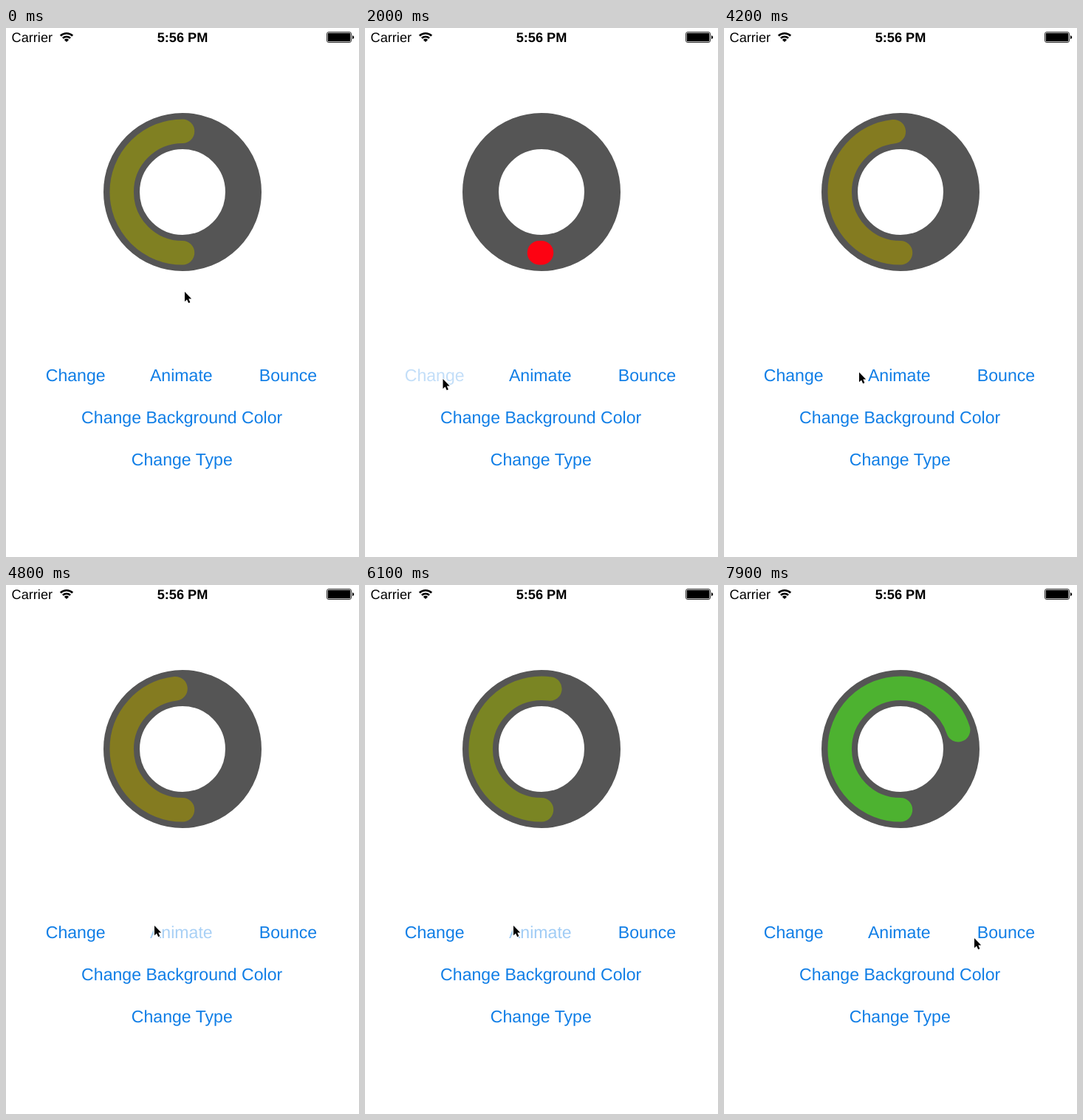
Write an HTML page that moves like this. It is 478x716 px and loops after 8 s.

```html
<!DOCTYPE html>
<html>
<head>
<meta charset="utf-8">
<style>
html, body { margin: 0; width: 100%; height: 100%; overflow: hidden; background: #fff; }
svg { display: block; width: 478px; height: 716px; }
text { font-family: "Liberation Sans", Arial, sans-serif; text-rendering: geometricPrecision; }
.button { font-size: 23.1px; fill: #107ee6; text-anchor: middle; }
.status { font-size: 18.2px; }
</style>
</head>
<body>
<svg viewBox="0 0 478 716">
  <text class="status" x="7.5" y="19">Carrier</text>
  <g fill="none" stroke="#000" stroke-width="2.6">
    <path d="M73.8 10.5 A12 12 0 0 1 90.2 10.5"/>
    <path d="M76.9 13.8 A7.4 7.4 0 0 1 87.1 13.8"/>
  </g>
  <path d="M82 19 L78.9 15.9 A4.4 4.4 0 0 1 85.1 15.9 Z"/>
  <text class="status" x="239" y="19" text-anchor="middle" font-weight="bold">5:56 PM</text>
  <rect x="434.5" y="5.5" width="33" height="14" rx="2.5" fill="none" stroke="#000" stroke-width="0.8"/>
  <rect x="435.7" y="6.7" width="30.6" height="11.6" rx="1.2"/>
  <path d="M469 10 Q471.2 10.5 471.2 12.5 T469 15 Z"/>

  <circle cx="239" cy="222" r="82.5" fill="none" stroke="#555" stroke-width="49"/>
  <circle id="arc" cx="239" cy="222" r="82.3" fill="none" stroke-width="32.5" stroke-linecap="round"
    pathLength="1" transform="rotate(90 239 222)"/>

  <text class="button" id="change" x="94.2" y="478">Change</text>
  <text class="button" id="animate" x="237.3" y="478">Animate</text>
  <text class="button" x="382" y="478">Bounce</text>
  <text class="button" x="238.2" y="535">Change Background Color</text>
  <text class="button" x="238.3" y="592">Change Type</text>

  <path id="cursor" d="M0 0 V13.2 L3 10.4 L5.2 15.2 L7.4 14.2 L5.3 9.6 H9.2 Z"
    stroke="#fff" stroke-width="1.8" stroke-linejoin="round" paint-order="stroke"/>
</svg>
<script>
const LOOP = 8000, STEP = 100, FADE = 500;
const el = id => document.getElementById(id);
const arc = el("arc"), cursor = el("cursor");

// button, press time, release time, new progress, duration of the ring's move
const clicks = [
  ["change", 1000, 1080, 0.3, 0],
  ["change", 1900, 1970, 0.006, 0],
  ["change", 2500, 2580, 0.5, 0],
  ["change", 3000, 3095, 0.869, 0],
  ["change", 3500, 3590, 0.482, 0],
  ["animate", 4600, 4700, 0.408, 400],
  ["animate", 5300, 5320, 0.52, 400],
  ["animate", 5900, 5980, 0.597, 400],
  ["animate", 6700, 6820, 0.699, 400]
];

// time, x, y of the pointer's tip
const stops = [
  [0, 242, 357], [800, 105.5, 475], [3700, 105.5, 475], [4200, 183, 466],
  [4400, 201, 461], [7400, 201, 461], [7900, 339, 478]
];

const clamp = v => Math.min(1, Math.max(0, v));
const ease = v => v * v * (3 - 2 * v);
const mix = (a, b, k) => a + (b - a) * k;

function pointer(t) {
  const i = Math.max(1, stops.findIndex(s => s[0] >= t));
  const [t0, x0, y0] = stops[i - 1], [t1, x1, y1] = stops[i];
  const k = ease(clamp((t - t0) / (t1 - t0)));
  return [mix(x0, x1, k), mix(y0, y1, k)];
}

function draw(t) {
  let p = 0.5;
  const alpha = { change: 1, animate: 1 };
  for (const [name, press, release, value, move] of clicks) {
    if (t >= press) alpha[name] = mix(0.2, 1, clamp((t - release) / FADE));
    if (t >= release) p = mix(p, value, move ? ease(clamp((t - release - 80) / move)) : 1);
  }
  for (const name in alpha) el(name).setAttribute("opacity", alpha[name]);
  arc.setAttribute("stroke-dasharray", p + " 2");
  arc.setAttribute("stroke", `rgb(${255 * (1 - p)}, ${255 * p}, ${18 + 62 * p * p})`);
  cursor.setAttribute("transform", `translate(${pointer(t)})`);
}

function tick() {
  draw(Math.floor(performance.now() % LOOP / STEP) * STEP);
  requestAnimationFrame(tick);
}
tick();
</script>
</body>
</html>
```
